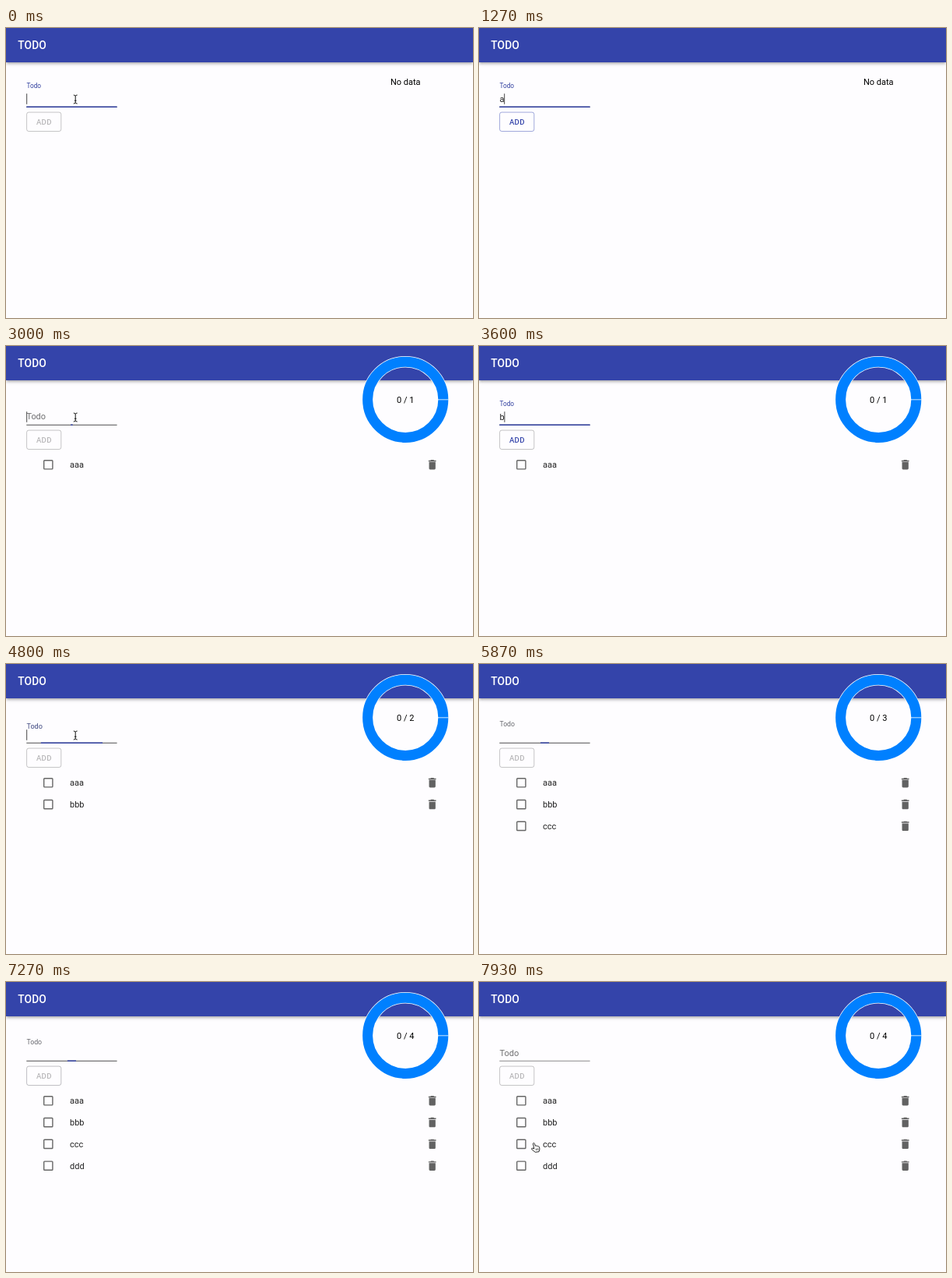
Animation, 600 px wide and 372 px high, one loop 8000 ms. Source, as an HTML page:

```html
<!DOCTYPE html>
<html lang="en">
<head>
<meta charset="utf-8">
<title>Todo</title>
<style>
  html, body { margin: 0; width: 100%; height: 100%; overflow: hidden; background: #fefdff; }
  header {
    position: absolute; inset: 0 0 auto; height: 43.6px; background: #3444aa;
    box-shadow: 0 1.4px 2.8px -.7px rgba(0,0,0,.2), 0 2.8px 3.5px rgba(0,0,0,.14), 0 .7px 7px rgba(0,0,0,.12);
  }
  svg { position: absolute; left: 0; top: 0; }
  text { font: 11px Roboto, sans-serif; fill: rgba(0,0,0,.87); white-space: pre; }
  .title { font-size: 13.8px; font-weight: 500; letter-spacing: .1px; fill: #fff; }
  .add { font-size: 9.65px; font-weight: 500; letter-spacing: .28px; text-anchor: middle; }
  .count { text-anchor: middle; fill: #000; }
</style>
</head>
<body>
<header></header>
<svg width="600" height="372" viewBox="0 0 600 372">
  <defs>
    <g id="row">
      <rect x="48.7" y="146.7" width="11.2" height="11.2" rx=".8" fill="none" stroke="#666" stroke-width="1.4"/>
      <path transform="translate(539.4 144) scale(.69)" fill="#626262"
        d="M6 19c0 1.1.9 2 2 2h8c1.1 0 2-.9 2-2V7H6v12zM19 4h-3.5l-1-1h-5l-1 1H5v2h14V4z"/>
    </g>
  </defs>
  <text class="title" x="15.3" y="26.6">TODO</text>
  <text id="label">Todo</text>
  <text id="value" x="26.4" y="94.9"></text>
  <path id="caret" stroke="#333" stroke-width=".9" d="M0 84.2V97.8"/>
  <path id="base" stroke="#000" d="M26.3 101.4H142.6"/>
  <path id="line" stroke="#303f9f" stroke-width="1.5" d="M-58.15 101.2H58.15"/>
  <rect id="box" x="26.6" y="108.1" width="44.2" height="24.4" rx="2.6" fill="none" stroke-width=".9"/>
  <text id="add" class="add" x="48.8" y="123.8">ADD</text>
  <g id="rows"></g>
  <g id="ring">
    <circle cx="513.2" cy="68.8" r="48.6" fill="none" stroke="#fff" stroke-width="14.4"/>
    <circle cx="513.2" cy="68.8" r="48.6" fill="none" stroke="#0080ff" stroke-width="13"/>
    <path d="M554.7 68.8H568.7" stroke="#fff" stroke-width=".8"/>
  </g>
  <text id="count" class="count" x="513.2" y="72.6"></text>
  <g id="beam" fill="none">
    <path d="M-2.4-5.4Q0-5.4 0-3.8Q0-5.4 2.4-5.4M0-3.8V4M-2.4 5.6Q0 5.6 0 4Q0 5.6 2.4 5.6M-1.3 1.8H1.3" stroke="#fff" stroke-width="2.2"/>
    <path d="M-2.4-5.4Q0-5.4 0-3.8Q0-5.4 2.4-5.4M0-3.8V4M-2.4 5.6Q0 5.6 0 4Q0 5.6 2.4 5.6M-1.3 1.8H1.3" stroke="#111" stroke-width="1"/>
  </g>
  <g id="hand">
    <path d="M-2.6-4.8C-2-6-.9-5.6-.6-4.6L.5-1.7C1.1-2.4 2-2.2 2.3-1.4C3-2 3.9-1.7 4.1-.9C4.9-1.3 5.5-.7 5.6.1L5.9 2.6L5 5.7L.3 6.3L-3.9 3C-5 1.9-4.2.8-3 1.2L-1.2 2Z"
      fill="#fff" stroke="#111" stroke-width=".9" stroke-linejoin="round"/>
    <path d="M.9 1.7L1.4 4M2.4 1.5L2.8 3.8M3.9 1.3L4.2 3.6" stroke="#111" stroke-width=".6"/>
  </g>
</svg>
<script>
const LOOP = 8000, LEAVE = 7640, ARRIVE = 7930;
const entries = [
  { ch: 'a', focus: -1030, keys: [930, 1290, 1600], off: 2330, submit: 2228, done: 2460 },
  { ch: 'b', focus: 3000, keys: [3580, 3730, 3880], off: 4060, submit: 4060, done: 4210 },
  { ch: 'c', focus: 4735, keys: [5060, 5230, 5420], off: 5650, submit: 5750, done: 5862 },
  { ch: 'd', focus: 6260, keys: [6510, 6720, 6900], off: 7120, submit: 7150, done: 7260 }
];
const el = {};
document.querySelectorAll('svg [id]').forEach(node => el[node.id] = node);

el.rows.innerHTML = entries.map(({ ch }, i) =>
  `<g transform="translate(0 ${i * 27.8})"><use href="#row"/><text x="82" y="156.2">${ch.repeat(3)}</text></g>`).join('');
const rows = [...el.rows.children];

const clamp = v => Math.min(1, Math.max(0, v));
const mix = (a, b, p) => a + (b - a) * p;
const show = (node, on) => node.setAttribute('visibility', on ? 'visible' : 'hidden');
const rgba = (from, to, p) => `rgba(${from.map((v, i) => mix(v, to[i], p))})`;

// cubic-bezier(x1, 0, .2, 1)
function ease(x, x1 = 0) {
  x = clamp(x);
  let lo = 0, hi = 1;
  for (let i = 0; i < 24; i++) {
    const s = (lo + hi) / 2, r = 1 - s;
    if (3 * r * r * s * x1 + .6 * r * s * s + s ** 3 < x) lo = s; else hi = s;
  }
  return 3 * (1 - lo) * lo * lo + lo ** 3;
}
const pulse = (t, on, off, time, x1) => ease((t - on) / time, x1) * (1 - ease((t - off) / time, x1));

function drawField(t) {
  const e = entries.findLast(e => e.focus <= t);
  const { focus, keys, off, submit, done } = e;
  const typed = keys.filter(k => k <= t);
  const focused = t < submit, busy = !focused && t < done;

  el.value.textContent = t < done ? e.ch.repeat(typed.length) : '';
  el.value.style.fill = busy ? 'rgba(0,0,0,.42)' : '';

  const since = t - (typed.at(-1) ?? focus);
  show(el.caret, focused && since % 1000 < 500);
  el.caret.setAttribute('transform', `translate(${26.7 + el.value.getComputedTextLength()} 0)`);

  const up = pulse(t, focus, done, 200);
  const active = pulse(t, focus, submit, 200);
  el.label.setAttribute('transform', `translate(26.4 ${mix(94.9, 76.8, up)}) scale(${mix(1, .75, up)})`);
  el.label.style.fill = rgba([0, 0, 0, .56], [48, 63, 159, 1], active);
  el.line.setAttribute('transform', `translate(84.45 0) scale(${active} 1)`);

  const hover = 1 - ease((t - LEAVE - 60) / 200, .4);
  el.base.setAttribute('stroke-width', busy ? .8 : 1.3);
  el.base.setAttribute('stroke-dasharray', busy ? '.7 .7' : 'none');
  el.base.setAttribute('stroke-opacity', busy ? .5 : mix(.36, .55, hover));

  const enabled = t >= keys[0] && t < off;
  el.box.setAttribute('stroke', rgba([0, 0, 0, .25], [63, 81, 181, .55], pulse(t, keys[0], off, 250, .4)));
  el.add.style.fill = enabled ? '#3444aa' : 'rgba(0,0,0,.28)';
}

function drawList(t) {
  const total = entries.filter(e => e.done <= t).length;
  rows.forEach((row, i) => show(row, i < total));
  show(el.ring, total);
  el.count.textContent = total ? `0 / ${total}` : 'No data';
}

function drawPointer(t) {
  const p = clamp((t - LEAVE) / (ARRIVE - LEAVE)), q = p * p * (3 - 2 * p);
  const x = mix(89.2, 72, q), y = mix(91.4, 212, q);
  const inField = y < 103;
  const aiming = entries.some(e => t >= e.focus - 130 && t < e.keys[0]);
  show(el.beam, inField && (aiming || t > LEAVE - 100));
  show(el.hand, !inField);
  for (const node of [el.beam, el.hand]) node.setAttribute('transform', `translate(${x} ${y})`);
}

const start = performance.now();
function frame() {
  const t = (performance.now() - start) % LOOP;
  drawField(t);
  drawList(t);
  drawPointer(t);
  requestAnimationFrame(frame);
}
frame();
</script>
</body>
</html>
```
